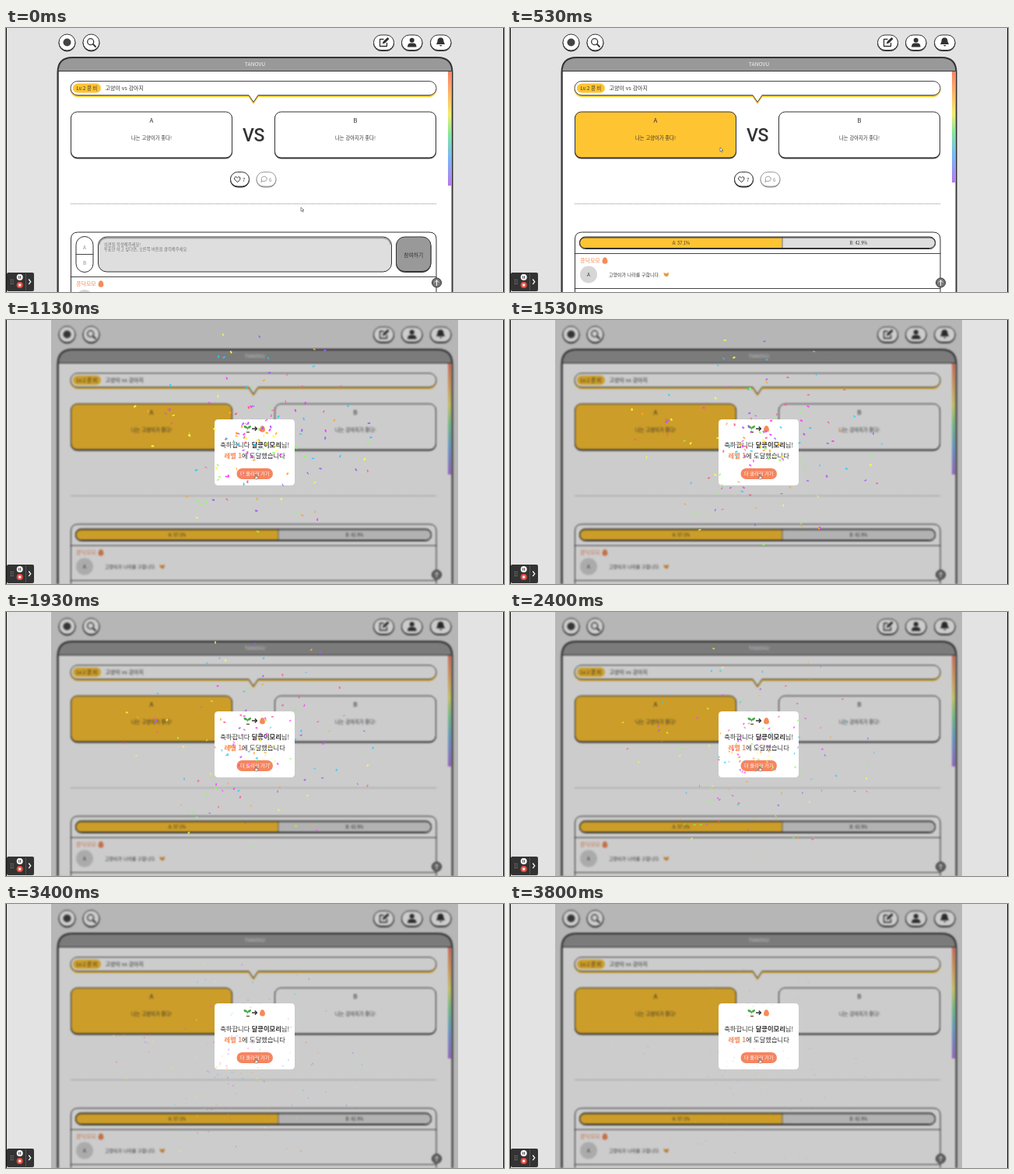
An HTML page with a canvas for the animation above (3.86 s loop, 640x340 px).

```html
<!DOCTYPE html>
<html lang="ko">
<head>
<meta charset="utf-8">
<style>
html, body { margin: 0; width: 100%; height: 100%; overflow: hidden; background: #e3e3e3; }
svg, canvas, #dim { position: absolute; left: 0; top: 0; }
#dim { left: 58px; width: 523px; height: 340px; background: #0003; }
text { font-family: "Noto Sans CJK KR", "Noto Sans CJK", sans-serif; font-size: 6.3px; fill: #333; dominant-baseline: central; }
.mid { text-anchor: middle; }
.box { fill: #fff; stroke: #333; }
.raised { filter: drop-shadow(0 1px 0 #333); }
.soft { stroke: #999; filter: drop-shadow(0 1px 0 #999); }
.line { fill: none; stroke: #333; stroke-width: 1.3; stroke-linecap: round; stroke-linejoin: round; }
.thin { stroke: #444; stroke-width: 1; }
.grey { fill: #888; }
.orange { fill: #f58b57; }
.voted #cardA { fill: #ffc432; }
.voted #rainbow { height: 143px; }
.blurred { filter: blur(.9px); }
</style>
</head>
<body>
<svg id="page" width="640" height="340">
  <defs>
    <linearGradient id="hues" x2="0" y2="1">
      <stop stop-color="#ff8068"/><stop offset=".22" stop-color="#ffbd68"/>
      <stop offset=".38" stop-color="#f1ed70"/><stop offset=".55" stop-color="#83e7a0"/>
      <stop offset=".75" stop-color="#79b8f5"/><stop offset="1" stop-color="#b679ef"/>
    </linearGradient>
    <path id="egg" class="orange" d="M0-4.2C2-4.2 3.4-1 3.4 1A3.4 3.2 0 0 1-3.4 1C-3.4-1-2-4.2 0-4.2Z"/>
  </defs>

  <g class="box raised">
    <circle cx="78.500" cy="18.500" r="10.500"/>
    <circle cx="109.500" cy="18.500" r="10.500"/>
    <rect x="472.500" y="9" width="26" height="19.500" rx="9.700"/>
    <rect x="508.500" y="9" width="26.500" height="19.500" rx="9.700"/>
    <rect x="545.500" y="9" width="26.500" height="19.500" rx="9.700"/>
  </g>
  <circle cx="78.500" cy="18.500" r="5" fill="#444"/>
  <circle class="line" cx="108.700" cy="17.700" r="4"/>
  <path class="line" style="stroke-width:1.8" d="M112 21l3 3"/>
  <path class="line" d="M485 14.500h-4.500v9h9v-4M484.500 19.500l5.500-5.500"/>
  <path d="M484 20l1-3 5.500-5 2 2-5.500 5.500zM558.500 12.500c3 0 4 2 4 5l1.500 3.500h-11l1.500-3.500c0-3 1-5 4-5zM557 22h3.500q-1.700 3-3.500 0z" fill="#333"/>
  <circle cx="521.700" cy="15.700" r="3" fill="#333"/>
  <path d="M516 24.500q0-5 4-5h3.500q4 0 4 5z" fill="#333"/>

  <path d="M66.500 345V57q0-19 19-19h469q19 0 19 19v288z" fill="#999" stroke="#333" stroke-width="2"/>
  <path d="M68 55.500h504.500V345H68z" fill="#fff"/>
  <path d="M67 55.500h506" stroke="#333"/>
  <text class="mid" x="320" y="46" style="font-size:6.800px;fill:#f2f2f2">TANOVU</text>
  <rect id="rainbow" x="568" y="56" width="4" height="147" fill="url(#hues)"/>

  <path d="M92 68.500H544a9 9 0 0 1 0 18H324l-6 9-6-9H92a9 9 0 0 1 0-18Z" style="fill:#fff;stroke:#333;stroke-width:.9;filter:drop-shadow(0 2px 0 #ffc432)"/>
  <rect x="86" y="71.500" width="36" height="12" rx="6" fill="#ffc432"/>
  <text class="mid" x="104" y="77.300">Lv.2 콩 비</text>
  <text x="127.500" y="77" style="font-size:7px">고양이 vs 강아지</text>

  <g class="box raised">
    <rect id="cardA" x="83.500" y="108" width="207" height="59" rx="8"/>
    <rect x="345.500" y="108" width="207" height="59" rx="8"/>
  </g>
  <g class="mid">
    <text x="187" y="118" style="font-size:8px;font-weight:500">A</text>
    <text x="449" y="118" style="font-size:8px;font-weight:500">B</text>
    <text x="187" y="141.500">나는 고양이가 좋다!</text>
    <text x="449" y="141.500">나는 강아지가 좋다!</text>
    <text x="318" y="138" style="font:500 23px Roboto,sans-serif;letter-spacing:-.500px">VS</text>
  </g>

  <rect class="box raised" x="288.500" y="185.500" width="24" height="18.500" rx="9.200"/>
  <path class="line" style="stroke-width:1" d="M297.300 198.500l-3.500-3.500q-1-2.500 1-3.300 1.500-.2 2.500 1.300 1-1.500 2.500-1.300 2 .8 1 3.300z"/>
  <text x="304" y="195">7</text>
  <rect class="box soft" x="322" y="185.500" width="25" height="18.500" rx="9.200"/>
  <path class="line" style="stroke:#999;stroke-width:1" d="M328 198l.700-2a3.600 3.100 0 1 1 2 1.300z"/>
  <text class="grey" x="338" y="195">6</text>
  <path d="M83 226.500h470" stroke="#aaa" stroke-dasharray="1.500 .7"/>

  <path class="box" d="M83.500 345V272q0-9 9-9h451.500q9 0 9 9v73"/>
  <g id="form">
    <rect class="box" x="90" y="268.500" width="22" height="46" rx="11"/>
    <path class="line thin" d="M90 291.500h22"/>
    <text class="mid grey" x="101" y="282.500">A</text>
    <text class="mid grey" x="101" y="302">B</text>
    <rect x="118.500" y="269" width="377" height="45" rx="11" fill="#dedede" stroke="#333"/>
    <path d="M120 279q1-8.500 10-8.500h354q9 0 10 8.500" fill="none" stroke="#999" stroke-width="1.500"/>
    <text x="126" y="278.500" style="font-size:5.300px;fill:#777">의견을 작성해주세요!</text>
    <text x="126" y="285" style="font-size:5.300px;fill:#777">투표만 하고 싶다면, 오른쪽 버튼을 클릭해주세요.</text>
    <rect class="raised" x="501.500" y="269" width="44.500" height="44.500" rx="11" fill="#999" stroke="#333"/>
    <text class="mid" x="523.700" y="291.500" style="font-size:6.800px">참여하기</text>
    <path class="line thin" d="M83 320.500h470"/>
    <text class="orange" x="90" y="329" style="font-size:7px">콩닥모모</text>
    <use href="#egg" x="122" y="329.500"/>
    <circle cx="101" cy="348" r="11" fill="#d6d6d6"/>
  </g>
  <g id="result">
    <rect x="89.500" y="269" width="457" height="14.500" rx="7" fill="#dedede"/>
    <path d="M350 269H96.500a7 7.250 0 0 0 0 14.500H350z" fill="#ffc432"/>
    <path d="M350 269v14.500" stroke="#777"/>
    <rect class="raised" x="89.500" y="269" width="457" height="14.500" rx="7" fill="none" stroke="#333"/>
    <text class="mid" x="220" y="276.500" style="font-size:5.600px">A: 57.1%</text>
    <text class="mid" x="448" y="276.500" style="font-size:5.600px">B: 42.9%</text>
    <path class="line thin" d="M83 290.500h470M83 335.500h470"/>
    <text class="orange" x="90" y="299" style="font-size:7px">콩닥모모</text>
    <use href="#egg" x="122" y="299.500"/>
    <circle cx="101" cy="317.500" r="11" fill="#d6d6d6"/>
    <text class="mid" x="101" y="317.500">A</text>
    <text x="127" y="317" style="font-size:6px">고양이가 나라를 구합니다.</text>
    <path d="M197.500 314.500l2 1.500h2l2.500-1.500-.5 4.500-2.500 1.500-3-2z" fill="#e99b3f"/>
  </g>
  <circle cx="553.500" cy="328" r="6" fill="#777" stroke="#333"/>
  <path class="line" style="stroke:#fff;stroke-width:1" d="M553.500 331.500v-6.500m-2.500 2.500l2.500-2.500 2.500 2.500"/>
</svg>

<div id="dim"></div>
<svg id="modal" width="640" height="340">
  <rect x="268" y="128" width="103" height="85" rx="4.500" fill="#fff"/>
  <path d="M309 144.500h4" stroke="#795540" stroke-width="1.500"/>
  <path d="M309.500 143.500q1-3 0-4-4 .5-4-3.500 4-.5 4.800 2.500 1-3 4.700-2.500 0 4-4 3.700z" fill="#45a944"/>
  <path class="line" d="M316.500 140h6m-2.300-2.300l2.300 2.300-2.300 2.300"/>
  <use href="#egg" x="329.500" y="140.300"/>
  <g class="mid">
    <text x="319.700" y="160" style="font-size:8.300px">축하합니다 <tspan font-weight="700">달콩이모리</tspan>님!</text>
    <text x="319.700" y="173.700" style="font-size:8.300px"><tspan class="orange" font-weight="700">레벨 1</tspan>에 도달했습니다</text>
    <rect x="296.500" y="191" width="46.500" height="14" rx="7" fill="#f58560"/>
    <text x="319.700" y="197.700" style="font-size:6.200px;font-weight:500;fill:#fff">더 올리러 가기</text>
  </g>
</svg>

<canvas id="confetti" width="640" height="340"></canvas>

<svg width="640" height="340">
  <path d="M.5 0v340M639.500 0v340" stroke="#111"/>
  <rect x="1" y="315" width="35" height="24" rx="2" fill="#333"/>
  <path d="M6.500 324v7M9 324v7" stroke="#aaa" stroke-dasharray="1 1.500"/>
  <circle cx="17.700" cy="321" r="4" fill="#fff"/>
  <path d="M16.700 319.300v3.400m2-3.400v3.400" stroke="#333"/>
  <circle cx="17.700" cy="331" r="4" fill="#f04a3e"/>
  <rect x="16.200" y="329.500" width="3" height="3" rx=".5" fill="#fff"/>
  <path d="M25.500 316v22" stroke="#555"/>
  <path class="line" style="stroke:#fff" d="M29.500 324l2.300 2.800-2.300 2.800"/>
  <g id="cursor" stroke="#444" stroke-width=".6" fill="#fff">
    <path id="arrow" d="M0 0v5l1.300-1 1 2 1-.5-1-2H4z"/>
    <path id="hand" d="M-.7 0h1.200v2.200l2.300.5v2l-.8 1.300h-2.500l-1.700-2 .5-.6 1 .6z"/>
  </g>
</svg>

<script>
const LOOP = 3860, HOVER = 260, VOTE = 460, BURST = 660, LIFE = 3450;
const COLORS = ['#26ccff', '#a25afd', '#ff5e7e', '#88ff5a', '#fcff42', '#ffa62d', '#ff36ff'];
const el = id => document.getElementById(id);
const ctx = el('confetti').getContext('2d');
const start = performance.now();

let seed = 41;
const rand = () => (seed = seed * 16807 % 2147483647) / 2147483647;
const pieces = Array.from({ length: 135 }, (_, i) => ({
  angle: rand() * Math.PI * 2, reach: 0.08 + 0.95 * rand() ** 1.3,
  wobble: rand() * 10, speed: 3 + rand() * 4, color: COLORS[i % COLORS.length]
}));

const show = (id, on) => el(id).style.display = on ? '' : 'none';

// Cursor stops: time, x, y
const stops = [[0, 379, 231], [60, 379, 231], [300, 270, 154], [600, 270, 154], [800, 320, 220], [1130, 321, 199], [LOOP, 321, 199]];
function cursorAt(t) {
  const i = stops.findIndex(s => s[0] > t);
  const [a, b] = [stops[i - 1], stops[i]];
  const k = (t - a[0]) / (b[0] - a[0]), e = k * k * (3 - 2 * k);
  return [a[1] + (b[1] - a[1]) * e, a[2] + (b[2] - a[2]) * e];
}

function drawConfetti(ms) {
  ctx.clearRect(0, 0, 640, 340);
  if (ms < 0) return;
  const s = ms / 1000;
  const spread = 1 - 0.9 ** (ms * 0.06);   // drag per 60 Hz tick
  ctx.globalAlpha = 1 - (ms / LIFE) ** 1.5;
  for (const p of pieces) {
    const w = p.wobble + s * p.speed;
    const x = 322 - 10 * s + Math.cos(p.angle) * p.reach * 170 * spread + 3 * Math.cos(w);
    const y = 134 + 26 * s + Math.sin(p.angle) * p.reach * 134 * spread + 3 * Math.sin(w);
    const width = 3.6 - 0.5 * s, height = 0.9 + 1.2 * Math.abs(Math.sin(w * 1.7));
    ctx.save();
    ctx.translate(x, y);
    ctx.rotate(w);
    ctx.fillStyle = p.color;
    ctx.fillRect(-width / 2, -height / 2, width, height);
    ctx.restore();
  }
}

function frame(now) {
  const t = Math.max(0, now - start) % LOOP;
  const burst = t >= BURST;
  const [x, y] = cursorAt(t);
  const onButton = burst && y < 205 && x > 300;
  el('page').classList.toggle('voted', t >= HOVER);
  el('page').classList.toggle('blurred', burst);
  show('form', t < VOTE);
  show('result', t >= VOTE);
  show('dim', burst);
  show('modal', burst);
  show('arrow', !onButton);
  show('hand', onButton);
  el('cursor').setAttribute('transform', `translate(${x} ${y})`);
  drawConfetti(t - BURST);
  requestAnimationFrame(frame);
}
requestAnimationFrame(frame);
</script>
</body>
</html>
```
